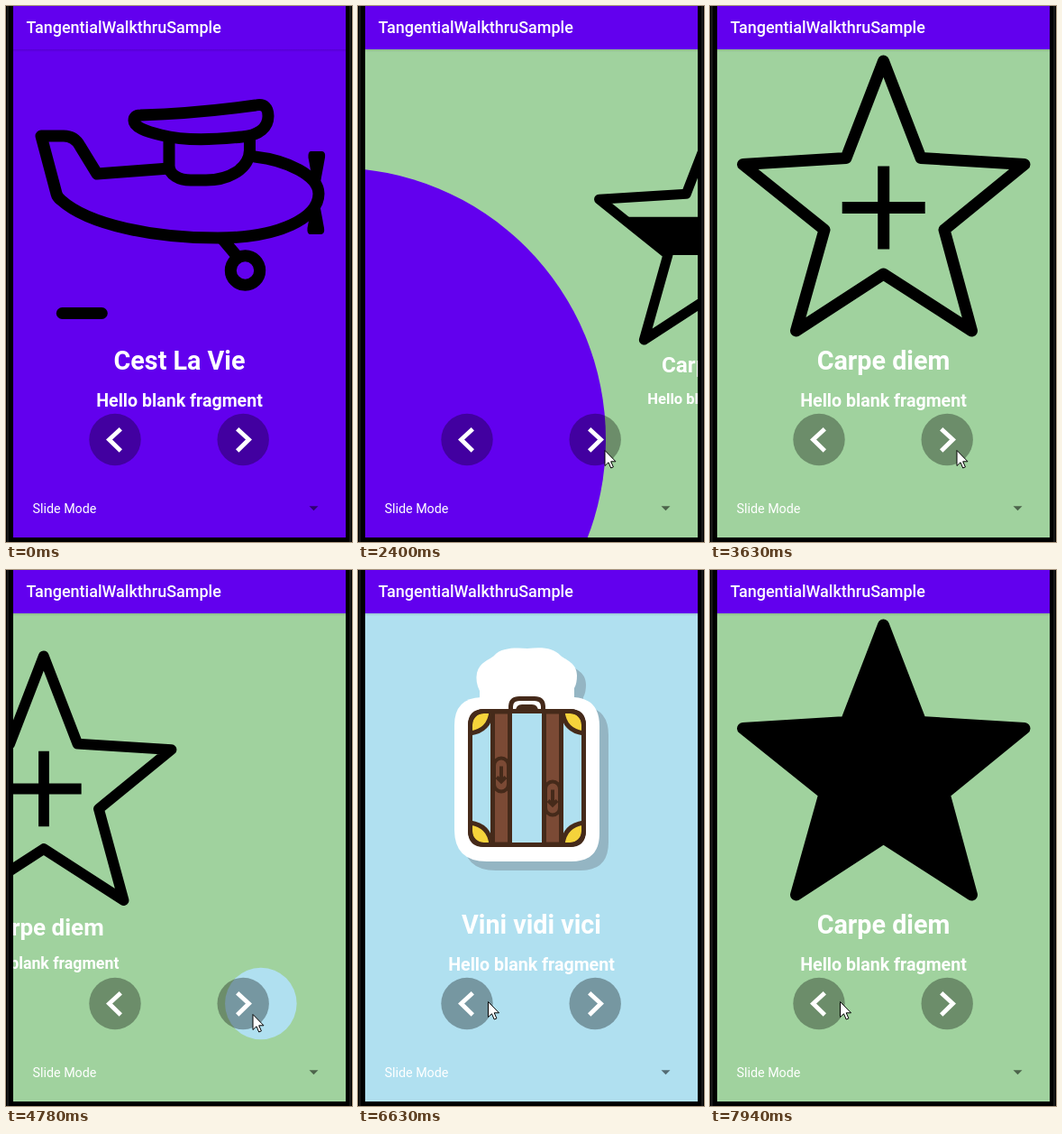
An HTML page that plays this animation: 384 px wide and 594 px high, repeating every 8 s.

```html
<!DOCTYPE html>
<html lang="en">
<head>
<meta charset="utf-8">
<title>Onboarding pager</title>
<style>
  html, body { margin: 0; width: 100%; height: 100%; overflow: hidden; background: #000; }
  svg { display: block; width: 100vw; height: 100vh; font-family: Roboto, sans-serif; fill: #fff; }
  .title { font-size: 28.7px; font-weight: 700; text-anchor: middle; }
  .sub { font-size: 19.6px; font-weight: 700; text-anchor: middle; }
  .ink { fill: none; stroke: #000; stroke-width: 13; stroke-linecap: round; stroke-linejoin: round; }
  .case { stroke: #452a1a; stroke-width: 5; }
</style>
</head>
<body>
<svg viewBox="0 0 384 594">
  <defs>
    <clipPath id="screen"><rect x="8" y="48" width="369" height="541"/></clipPath>
    <path id="starShape" d="M192.5 61 L234 168.5 L349 175.5 L260 248 L290.5 360 L192.5 297 L95.5 360 L127 248 L36.5 175.5 L151 168.5 Z"/>
    <clipPath id="starClip"><use href="#starShape"/></clipPath>
    <linearGradient id="shade" x2="0" y2="1">
      <stop stop-opacity=".13"/><stop offset="1" stop-opacity="0"/>
    </linearGradient>
    <g id="sticker">
      <path d="M135 150 V134 Q130 124 132 114 C135 102 145 100 151 95 C158 86 175 86 188 87 C204 85 217 86 225 95 C231 100 243 103 243 117 Q243 126 240 131 V150 Z"/>
      <path d="M137 141 H240 Q268 143 268 173 V292 Q268 323 237 323 H143 Q107 323 107 288 V172 Q107 142 137 141 Z"/>
    </g>
    <path id="blade" d="M338 161 H351 Q355 162 354 168 L348.500 198 H341 L335.500 168 Q335 162 338 161 Z"/>
    <path id="corner" class="case" d="M124.500 181 V172 Q124.500 156.500 140 156.500 H148 Q146 178 124.500 181 Z" fill="#f5d33b"/>
    <g id="buckle" fill="none" class="case">
      <path d="M-8 -10 A8 8 0 0 1 8 -10 V11 A8 8 0 0 1 -8 11 Z" fill="#7b4a35" stroke-width="4"/>
      <path d="M0 -9 V7 M-5 3 L0 8 L5 3" stroke-width="4"/>
    </g>
  </defs>

  <path d="M2 0 V594 M382 0 V594" stroke="#222" stroke-width="1.500"/>

  <g clip-path="url(#screen)">
    <rect id="base" x="8" y="48" width="369" height="541"/>
    <circle id="reveal" cy="480.500"/>

    <g class="page">
      <g id="plane" class="ink">
        <path d="M181 180 L101 186 L82 155 Q76 144 64 144 H39 L56 208 Q57 212 61 215 C92 243 165 257 235 257 C303 257 347 235 347 208 C347 188 312 171 276 167"/>
        <path d="M181 146 V177 C181 187 192 193 205 193 H222 C248 193 270 180 270.500 160 V146"/>
        <path d="M149 121 Q213 119 277 110 C287 108 291 113 291 122 C291 134 282 143 262 145 C232 148 200 150 172 143 C155 139 142 134 142 127 Q142 121 149 121 Z"/>
        <path d="M240 258 L257 278"/>
        <circle cx="265.500" cy="293" r="16.200"/>
        <g fill="#000" stroke="none">
          <use href="#blade"/>
          <use href="#blade" transform="matrix(1 0 0 -1 -1 414)"/>
        </g>
      </g>
      <path id="lowDash" class="ink"/>
      <path id="highDash" class="ink"/>
      <text class="title" x="192.500" y="403">Cest La Vie</text>
      <text class="sub" x="192.500" y="444">Hello blank fragment</text>
    </g>

    <g class="page">
      <g fill="none" stroke="#000" clip-path="url(#starClip)">
        <path id="barAcross"/>
        <path id="barDown"/>
      </g>
      <use href="#starShape" class="ink"/>
      <text class="title" x="192.500" y="403">Carpe diem</text>
      <text class="sub" x="192.500" y="444">Hello blank fragment</text>
    </g>

    <g class="page">
      <use href="#sticker" x="10" y="10" fill="#94b5c3"/>
      <use href="#sticker"/>
      <rect x="124.500" y="156.500" width="126" height="148" rx="15" fill="#b0e0f0"/>
      <g fill="#7b4a35" class="case">
        <rect x="149.500" y="157" width="19" height="147"/>
        <rect x="206.500" y="157" width="19" height="147"/>
      </g>
      <use href="#corner"/>
      <use href="#corner" transform="matrix(-1 0 0 1 375 0)"/>
      <use href="#corner" transform="matrix(1 0 0 -1 0 461)"/>
      <use href="#corner" transform="matrix(-1 0 0 -1 375 461)"/>
      <rect class="case" x="124.500" y="156.500" width="126" height="148" rx="15" fill="none"/>
      <path class="case" fill="none" d="M169.500 157 V151 Q170 142.500 179 142.500 H196 Q205 142.500 205.500 151 V157"/>
      <path d="M175 157 Q175 149 182 149 H193 Q200 149 200 157 Z" fill="#452a1a"/>
      <use id="buckleA" href="#buckle"/>
      <use id="buckleB" href="#buckle"/>
      <text class="title" x="192.500" y="403">Vini vidi vici</text>
      <text class="sub" x="192.500" y="444">Hello blank fragment</text>
    </g>

    <rect x="8" y="48" width="369" height="3" fill="url(#shade)"/>
    <g fill="#000" fill-opacity=".33">
      <circle cx="121" cy="480.500" r="28.700"/>
      <circle cx="263.200" cy="480.500" r="28.700"/>
    </g>
    <path d="M127.300 468.700 L114.500 480.500 L127.300 493 M256.700 468.700 L269.500 480.500 L256.700 493" fill="none" stroke="#fff" stroke-width="4.800"/>
    <text x="29.500" y="562" font-size="14.300">Slide Mode</text>
    <path d="M336.500 554.300 H346.500 L341.500 559.300 Z" fill="#000" fill-opacity=".52"/>
  </g>

  <rect x="8" width="369" height="48" fill="#6200ee"/>
  <text x="22.500" y="30" font-size="18" font-weight="500">TangentialWalkthruSample</text>
  <path id="cursor" d="M0 0 V17 L4 13.300 L6.700 19.500 L9.400 18.400 L6.700 12.300 H12 Z" stroke="#000"/>
</svg>

<script>
const LOOP = 8000;
const COLORS = ['#6200ee', '#a0d29e', '#b0e0f0'];
const CENTER = 192.5, PIVOT_Y = 425;
const el = id => document.getElementById(id);
const pages = [...document.querySelectorAll('.page')];
const set = (id, attrs) => {
  for (const key in attrs) el(id).setAttribute(key, attrs[key]);
};
const clamp = x => Math.min(1, Math.max(0, x));
const span = (t, start, length) => clamp((t - start) / length);
const smooth = u => u * u * (3 - 2 * u);
const mix = (a, b, u) => a + (b - a) * u;
const wave = (t, period) => Math.cos(2 * Math.PI * t / period);

// Fractional page index: two steps forward, one back.
const slide = (t, start) => 1 - (1 - span(t, start, 885)) ** 1.5;
const pageAt = t => slide(t, 1895) + slide(t, 4656) - slide(t, 6690);

function drawPager(v) {
  const i = Math.min(1, Math.floor(v));
  const pos = v - i;
  const growing = pos < 0.5;
  const p = growing ? 2 * pos : 2 * pos - 1;
  const r = 0.1735 * 2 ** (19.2 * (growing ? p : 1 - p));
  const cx = growing ? 261.4 - 31 * (1 - p) + r : 261.4 + 31 * p - r;
  set('base', { fill: COLORS[growing ? i : i + 1] });
  set('reveal', { cx, r: pos > 0 && pos < 1 ? r : 0, fill: COLORS[growing ? i + 1 : i] });

  pages.forEach((page, n) => {
    const d = n - v;
    const s = 1 - 1.155 * Math.abs(d) ** 1.577;
    page.setAttribute('display', Math.abs(d) < 0.6 ? 'inline' : 'none');
    page.setAttribute('transform',
      `translate(${CENTER + 738 * d} ${PIVOT_Y}) scale(${s}) translate(${-CENTER} ${-PIVOT_Y})`);
  });
}

function drawDash(id, phase, x, y, length) {
  const d = phase - Math.round(phase);
  const half = length / 2 * Math.cos(2 * Math.PI * d);
  const mid = x - 160 * d;
  set(id, {
    d: `M${mid - half} ${y} H${mid + half}`,
    display: Math.abs(d) < 0.25 ? 'inline' : 'none'
  });
}

function drawPlane(t) {
  const dip = (1 - wave(t, 820)) / 2;
  set('plane', { transform: `translate(0 ${11.3 * dip}) rotate(${-1.8 * dip} 192 207)` });
  drawDash('lowDash', t / 820, 84.5, 340.5, 44);
  drawDash('highDash', t / 820 - 0.5, 155, 80.5, 23);
}

// The solid star thins to a plus, waits, then fills again.
function drawStar(t) {
  const c = t % 1140;
  const thin = span(c, 0, 210) - span(c, 470, 210);
  const width = mix(13, 303, (1 - thin) ** 2.4);
  const half = mix(46, 166, 1 - thin ** 3);
  const x = 192.7, y = 223.5;
  set('barAcross', { d: `M${x - half} ${y} H${x + half}`, 'stroke-width': width });
  set('barDown', { d: `M${x} ${y - half} V${y + half}`, 'stroke-width': width });
}

function drawBuckles(t) {
  const sway = 13 * wave(t - 6630, 1140);
  set('buckleA', { transform: `translate(159 ${239.5 - sway})` });
  set('buckleB', { transform: `translate(216 ${239.5 + sway})` });
}

function drawCursor(t) {
  const enter = smooth(span(t, 280, 520));
  const back = smooth(span(t, 5550, 560));
  const x = mix(mix(336, 274, enter), 144.5, back);
  const y = mix(mix(559, 492.5, enter), 478.5, back);
  set('cursor', { transform: `translate(${x} ${y})`, display: t < 280 ? 'none' : 'inline' });
}

function render(t) {
  drawPager(pageAt(t));
  drawPlane(t);
  drawStar(t);
  drawBuckles(t);
  drawCursor(t);
}

function tick() {
  render(performance.now() % LOOP);
  requestAnimationFrame(tick);
}
tick();
</script>
</body>
</html>
```
